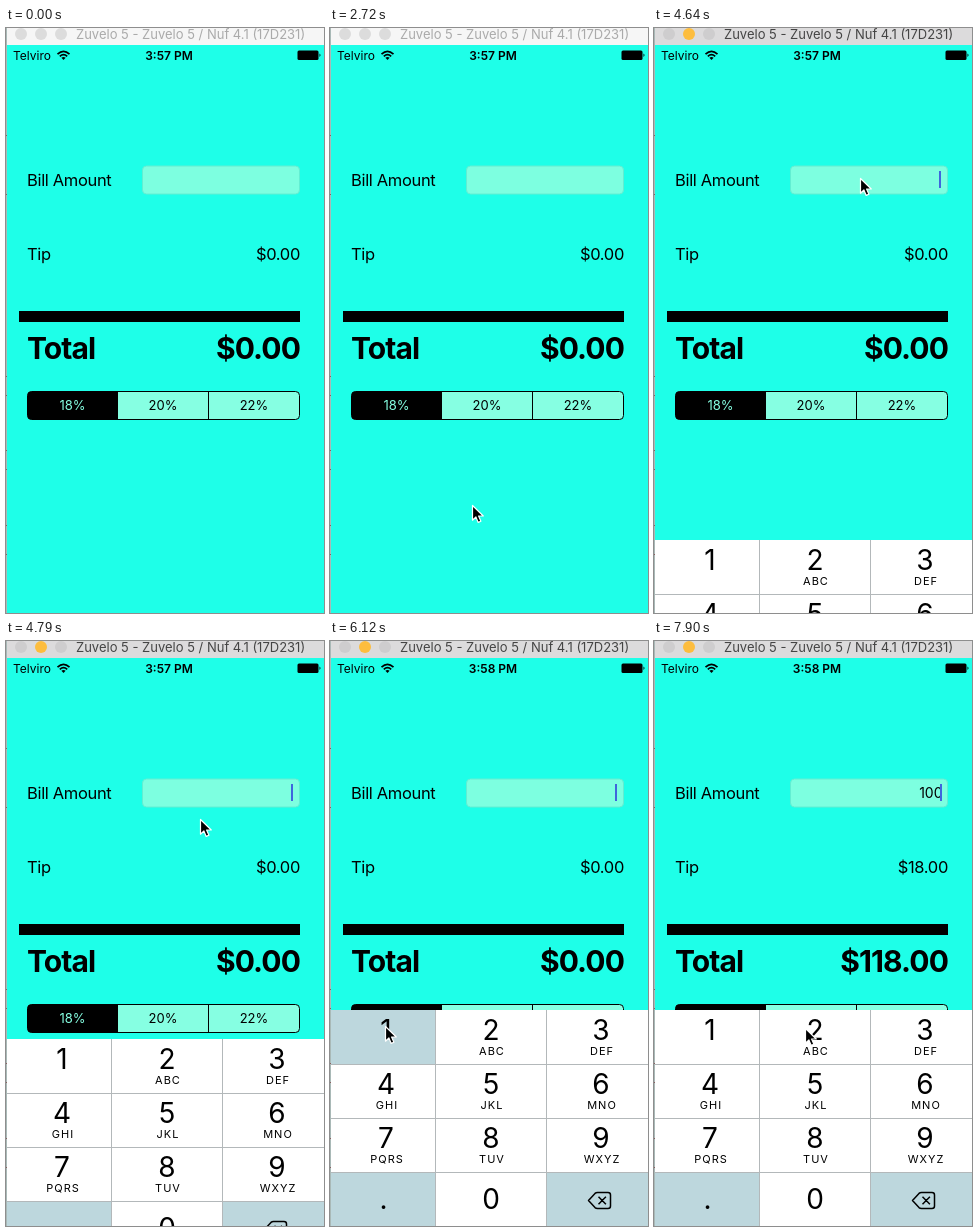
Animation of 318 by 585 pixels, one loop 8 s. Source, as an HTML page:

```html
<!DOCTYPE html>
<html lang="en">
<head>
<meta charset="utf-8">
<title>Tip calculator</title>
<style>
  html, body { margin: 0; width: 100%; height: 100%; overflow: hidden; }
  svg { display: block; width: 318px; height: 585px; font-family: Inter, "Open Sans", sans-serif; }
  .label { font-size: 16.5px; letter-spacing: -.02em; }
  .total { font-size: 30px; font-weight: 700; letter-spacing: -.03em; }
  .small { font-size: 12px; }
  .segment { font-size: 13px; }
  .digit { font-size: 28px; }
  .letters { font-size: 11px; letter-spacing: 1px; }
  .mid { text-anchor: middle; }
  .end { text-anchor: end; }
</style>
</head>
<body>
<svg viewBox="0 0 318 585">
  <rect width="318" height="585" fill="#1effe8"/>

  <rect id="bar" width="318" height="17"/>
  <g id="lights"><circle cx="15" cy="6" r="6"/><circle cx="35" cy="6" r="6"/><circle cx="55" cy="6" r="6"/></g>
  <text id="title" x="70" y="11" font-size="13">Zuvelo 5 - Zuvelo 5 / Nuf 4.1 (17D231)</text>

  <text class="small" x="7" y="31.5">Telviro</text>
  <g fill="none" stroke="#000" stroke-width="1.7">
    <path d="M51.5 26.2Q57.5 20.6 63.5 26.2M53.8 28.4Q57.5 25 61.2 28.4"/>
    <path d="M55.4 29.8Q57.5 28 59.6 29.8L57.5 32Z" fill="#000" stroke="none"/>
  </g>
  <text id="clock" class="small mid" x="163" y="31.5" font-weight="600"></text>
  <rect x="291.5" y="22.5" width="21" height="9.5" rx="1.5"/>
  <path d="M313.5 25.5q2 1.7 0 3.5z"/>

  <text class="label" x="21" y="158">Bill Amount</text>
  <rect x="136.5" y="138" width="157" height="28" rx="4" fill="#7dffe0" stroke="#62eed2"/>
  <text id="bill" class="end" x="288.5" y="157" font-size="14"></text>
  <rect id="caret" y="143" width="2" height="17" fill="#3f66dc"/>
  <text class="label" x="21" y="231.5">Tip</text>
  <text id="tip" class="label end" x="294" y="231.5"></text>
  <rect x="13" y="283" width="281" height="11"/>
  <text class="total" x="21" y="331">Total</text>
  <text id="total" class="total end" x="294" y="331"></text>

  <rect x="21.5" y="363.5" width="272" height="28" rx="4" fill="#86ffe2" stroke="#000"/>
  <path d="M112 363.5H25.5a4 4 0 0 0-4 4v20a4 4 0 0 0 4 4H112zM202 364h1v27h-1z"/>
  <g class="segment mid">
    <text x="66.5" y="382" fill="#86ffe2">18%</text>
    <text x="157" y="382">20%</text>
    <text x="248" y="382">22%</text>
  </g>

  <g id="keyboard"></g>

  <rect width="1" height="585" fill="#a9b9b7"/>
  <path id="ticks" stroke="#8a5f5f"/>
  <path id="pointer" stroke="#fff" stroke-width="1.2" stroke-linejoin="round"
    d="M.5 .5V15.2L3.9 12 6.2 17.4 8.9 16.2 6.6 11H11.3Z"/>
</svg>
<script>
const $ = id => document.getElementById(id);
const LOOP = 8000, START = 494, STEP = 148, KEYBOARD_TOP = 369;

// Pointer tip: step, x, y
const path = [
  [0, 151, 544], [3, 150, 516], [7, 148, 492], [9, 148, 490], [14, 148, 490],
  [15, 142, 477], [17, 118, 390], [18, 118, 335], [20, 155, 238], [21, 187, 201],
  [22, 217, 123], [23, 215, 121], [24, 210, 134], [26, 206, 150], [28, 206, 150],
  [30, 182, 205], [32, 125, 300], [34, 86, 357], [35, 74, 370], [36, 63, 377],
  [37, 63, 377], [38, 55, 385], [39, 57, 390], [41, 105, 490], [43, 150, 557],
  [49, 150, 557], [50, 151, 387]
];

function pointerAt(k) {
  const i = path.findIndex(p => p[0] >= k);
  if (i < 1) return path[i ? path.length - 1 : 0].slice(1);
  const [a, b] = [path[i - 1], path[i]], f = (k - a[0]) / (b[0] - a[0]);
  return [1, 2].map(n => Math.round(a[n] + (b[n] - a[n]) * f));
}

function buildKeyboard() {
  const edges = [1, 105, 216, 318], centers = [56, 161, 271], gray = "#bdd7dd";
  const keys = ["1", "2 ABC", "3 DEF", "4 GHI", "5 JKL", "6 MNO", "7 PQRS", "8 TUV", "9 WXYZ", ".", "0", ""];
  let out = "";
  keys.forEach((key, i) => {
    const col = i % 3, y = (i - col) / 3 * 54, x = edges[col], last = y === 162;
    const [digit, letters = ""] = key.split(" ");
    const cx = key === "." ? 53.5 : centers[col];
    out += `<rect id="key${i}" x="${x}" y="${y}" width="${edges[col + 1] - x}" height="54" fill="${last && col !== 1 ? gray : "#fff"}"/>
      <text class="digit mid" x="${cx}" y="${y + (last ? 37 : 30)}">${digit}</text>
      <text class="letters mid" x="${cx + 1}" y="${y + 45}">${letters}</text>`;
  });
  out += `<path d="M105.5 0V216M216.5 0V216M1 54.5H318M1 108.5H318M1 162.5H318" stroke="#b3b8ba"/>
    <path d="M258.5 190.5L265 183.4Q266 182.5 267.5 182.5H278Q280.5 182.5 280.5 185V196Q280.5 198.5 278 198.5H267.5Q266 198.5 265 197.6ZM268.5 186.8l7.4 7.4m0-7.4l-7.4 7.4" fill="none" stroke="#000" stroke-width="1.5" stroke-linejoin="round"/>`;
  $("keyboard").innerHTML = out;
}

function draw(now) {
  const k = Math.floor((now % LOOP - START) / STEP);
  const active = k >= 28;

  $("bar").setAttribute("fill", active ? "#dcdbdc" : "#f6f6f6");
  $("title").setAttribute("fill", active ? "#444" : "#aaa");
  [...$("lights").children].forEach((c, i) =>
    c.setAttribute("fill", !active ? "#dcdcdc" : i === 1 ? "#fdbd3e" : "#cecdce"));
  $("clock").textContent = k < 30 ? "3:57 PM" : "3:58 PM";

  const bill = k < 39 ? "" : k < 46 ? "1" : k < 48 ? "10" : "100";
  $("bill").textContent = bill;
  $("tip").textContent = "$" + (bill * .18).toFixed(2);
  $("total").textContent = "$" + (bill * 1.18).toFixed(2);

  const caretOn = k >= 28 && k < 32 || k >= 38 && k < 42 || k >= 46;
  $("caret").setAttribute("x", bill ? 286 : 285);
  $("caret").setAttribute("visibility", caretOn ? "visible" : "hidden");

  const top = active ? Math.round(KEYBOARD_TOP + 143 * .2 ** (k - 28)) : 585;
  $("keyboard").setAttribute("transform", `translate(0 ${top})`);
  $("key0").setAttribute("fill", k === 38 ? "#bdd7dd" : "#fff");

  $("pointer").setAttribute("visibility", k < 0 ? "hidden" : "visible");
  $("pointer").setAttribute("transform", `translate(${pointerAt(k)})`);
}

function tick() {
  draw(performance.now());
  requestAnimationFrame(tick);
}

$("ticks").setAttribute("d", [107, 166, 348, 367, 422, 441, 497, 526].map(y => `M0 ${y}.5h1`).join(""));
buildKeyboard();
tick();
</script>
</body>
</html>
```
